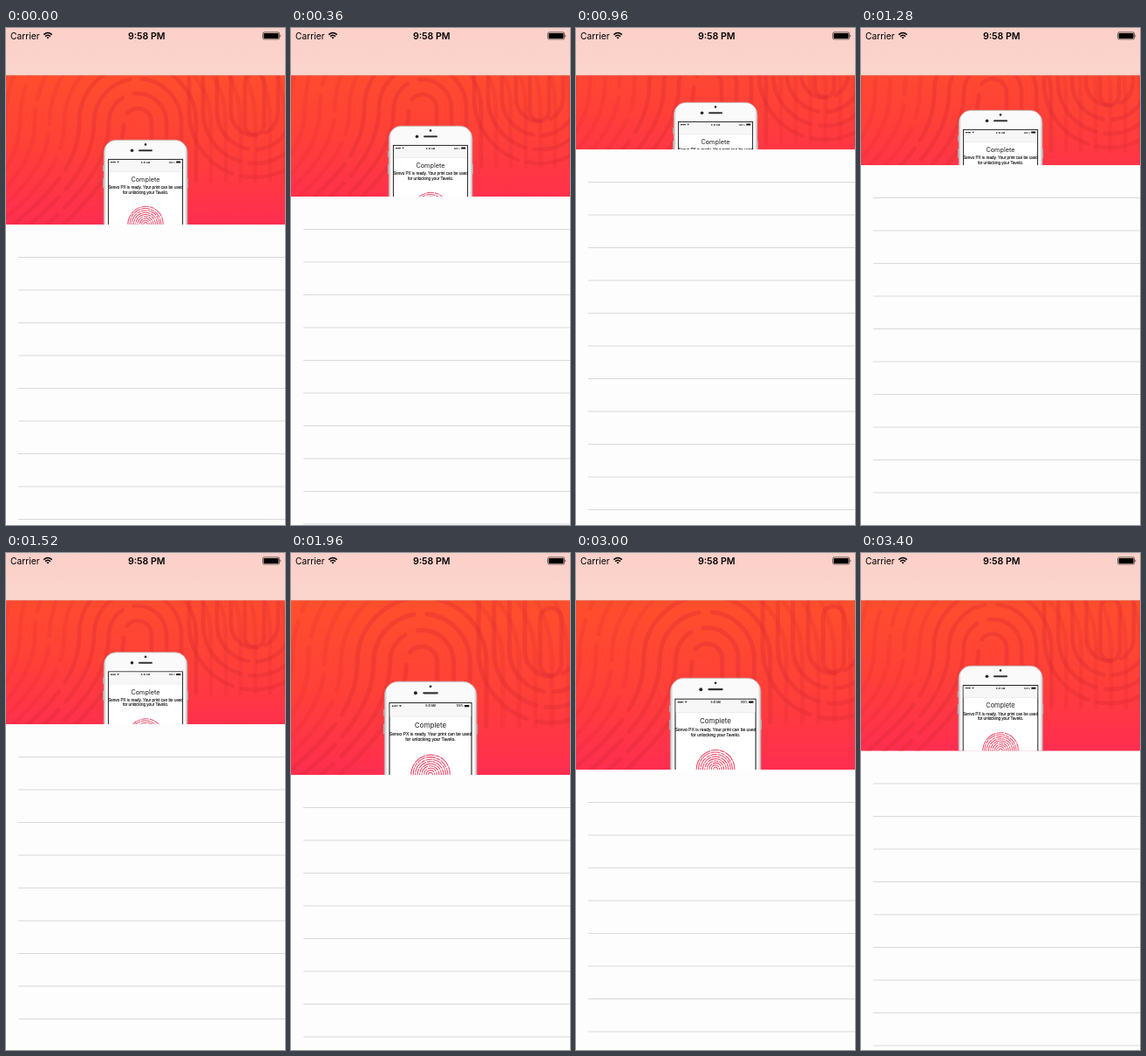
Recreate the animation shown at these times as an HTML page. Size 320 by 569 pixels, loop 3440 ms.

```html
<!DOCTYPE html>
<html lang="en">
<head>
<meta charset="utf-8">
<title>Stretchy header</title>
<style>
  html, body { margin: 0; width: 100%; height: 100%; overflow: hidden; background: #fdfdfd; }
  svg { display: block; width: 100%; height: 100%; }
  text { font-family: Inter, Roboto, "Liberation Sans", sans-serif; }
  .tiny { font: 4.6px "Liberation Sans", Inter, sans-serif; fill: #111; stroke: #111; stroke-width: .1; text-anchor: middle; }
  .status { font-size: 2.6px; font-weight: 700; fill: #222; }
</style>
</head>
<body>
<svg viewBox="0 0 320 569" preserveAspectRatio="none">
  <defs>
    <linearGradient id="sky" gradientUnits="userSpaceOnUse" x1="0" y1="45" x2="0" y2="232">
      <stop offset="0" stop-color="#ff4f2b"/>
      <stop offset=".5" stop-color="#ff4038"/>
      <stop offset="1" stop-color="#ff2c52"/>
    </linearGradient>
    <linearGradient id="bar" x2="0" y2="1">
      <stop offset="0" stop-color="#fbd0c9"/>
      <stop offset="1" stop-color="#fbd5cc"/>
    </linearGradient>
    <linearGradient id="shell">
      <stop offset="0" stop-color="#c9c6c8"/>
      <stop offset=".03" stop-color="#fafafa"/>
      <stop offset=".97" stop-color="#fafafa"/>
      <stop offset="1" stop-color="#c9c6c8"/>
    </linearGradient>
    <clipPath id="window"><rect id="pane" y="54" width="320"/></clipPath>
  </defs>
  <rect width="320" height="569" fill="#fdfdfd"/>
  <g clip-path="url(#window)">
    <g id="photo">
      <rect x="-10" y="0" width="340" height="330" fill="url(#sky)"/>
      <g id="ridges" fill="none" stroke="#d92a32" stroke-opacity=".34" stroke-width="4.6" stroke-linecap="round"/>
      <rect x="110.9" y="157" width="2" height="7" rx=".6" fill="#b9a5a8"/>
      <rect x="110.9" y="172" width="2" height="11" rx=".6" fill="#b9a5a8"/>
      <rect x="207.4" y="172" width="1.6" height="11" rx=".6" fill="#b9a5a8"/>
      <rect x="112.3" y="128.3" width="95.6" height="200" rx="14" fill="url(#shell)" stroke="#bcb5b8" stroke-width=".8"/>
      <circle cx="160" cy="133.4" r="1.3" fill="#333"/>
      <circle cx="144.5" cy="140.2" r="1.8" fill="#24242a"/>
      <rect x="152" y="139.2" width="16" height="2" rx="1" fill="#333"/>
      <rect x="117.4" y="150.4" width="85.2" height="170" fill="#fff" stroke="#222" stroke-width="1"/>
      <rect x="118" y="151" width="84" height="13.5" fill="#f7f7f8"/>
      <path d="M118 164.5H202" stroke="#d8d8dc" stroke-width=".4"/>
      <path d="M120 153.6h6" stroke="#222" stroke-width="1.3" stroke-dasharray="1.1 .3"/>
      <path d="M127.3 152.8h2.6l-1.3 1.7z" fill="#222"/>
      <text class="status" x="160" y="154.6" text-anchor="middle">9:41 AM</text>
      <text class="status" x="194" y="154.6" text-anchor="end">100%</text>
      <rect x="195.2" y="152.6" width="5" height="2" rx=".4" fill="#111"/>
      <text x="160" y="176" font-size="7.3" fill="#222" text-anchor="middle">Complete</text>
      <text class="tiny" x="160" y="184.3">Senvo PX is ready. Your print can be used</text>
      <text class="tiny" x="160" y="189.5">for unlocking your Tavelo.</text>
      <g id="print" fill="none" stroke="#ea4968" stroke-width="1"/>
    </g>
  </g>
  <g id="rows" stroke="#d5d5d8" stroke-width=".9"></g>
  <rect width="320" height="54" fill="url(#bar)"/>
  <path d="M0 54.2H320" stroke="#d99a8e" stroke-width=".6"/>
  <text x="5" y="12.6" font-size="10.3">Carrier</text>
  <g fill="none" stroke="#000" stroke-width="1.5">
    <path d="M43.3 7.6Q48 3.4 52.7 7.6M45 9.6Q48 7 51 9.6"/>
    <path d="M46.4 10.8Q48 9.6 49.6 10.8L48 12.6z" fill="#000" stroke="none"/>
  </g>
  <text x="161.3" y="12.6" font-size="10.6" font-weight="600" text-anchor="middle">9:58 PM</text>
  <rect x="294.6" y="4.9" width="19" height="8" rx="1.6" fill="none" stroke="#000" stroke-width=".6"/>
  <rect x="295.6" y="5.9" width="17" height="6" rx=".8"/>
  <path d="M314.6 7.4q1.6 1.5 0 3z"/>
</svg>
<script>
const LOOP = 3440, STEP = 40, TOP = 54, REST = 225, ROW = 37.5;
// Header bottom edge over time: [ms, y]
const keys = [
  [0, 225], [80, 224], [320, 197], [640, 166], [960, 139], [1060, 136],
  [1200, 147], [1520, 196], [1760, 232], [1960, 254], [2240, 270],
  [2440, 274], [2640, 277], [2820, 275.5], [2960, 253], [3120, 236],
  [3280, 228.8], [3400, 226.5], [3440, 225]
];
const $ = id => document.getElementById(id);

function add(parent, name, attrs) {
  const el = document.createElementNS("http://www.w3.org/2000/svg", name);
  for (const k in attrs) el.setAttribute(k, attrs[k]);
  parent.appendChild(el);
  return el;
}

// Large fingerprint behind the phone
for (let r = 16; r < 190; r += 17) {
  add($("ridges"), "path", {
    d: `M${151 + r} 175V108A${r} ${r} 0 0 0 ${151 - r} 108` +
       `C${151 - r} 155 ${118 - r} 192 ${70 - r * 1.15} 238`,
    "stroke-dasharray": `${90 + r} 14 ${130 + r / 2} 12`,
    "stroke-opacity": r > 68 ? .2 : .34
  });
}
add($("ridges"), "rect", { x: 274, y: 52, width: 22, height: 70, rx: 11 });
for (let r = 27; r < 76; r += 16) {
  add($("ridges"), "path", {
    d: `M${285 - r} 25V96A${r} ${r} 0 0 0 ${285 + r} 96V25`,
    "stroke-dasharray": `${88 + r} 11`
  });
}

// Small fingerprint on the screen
let seed = 11;
const rnd = () => (seed = seed * 16807 % 2147483647) / 2147483647;
for (let r = 2; r < 21; r += 2.25) {
  add($("print"), "ellipse", {
    cx: 160, cy: 224.5, rx: r, ry: r * 1.02,
    "stroke-dasharray": [0, 0, 0].map(() => `${(4 + rnd() * 9).toFixed(1)} .8`).join(" "),
    transform: `rotate(${Math.round(rnd() * 360)} 160 224.5)`
  });
}

const lines = Array.from({ length: 12 }, () => add($("rows"), "path", { d: "M14 0H320" }));

const slope = i => (keys[i + 1][1] - keys[i][1]) / (keys[i + 1][0] - keys[i][0]);
function tangent(i) {
  if (i === 0 || i === keys.length - 1) return 0;
  const a = slope(i - 1), b = slope(i);
  return a * b > 0 ? 2 * a * b / (a + b) : 0;
}

function edgeAt(t) {
  let i = 0;
  while (i < keys.length - 2 && t >= keys[i + 1][0]) i++;
  const [t0, y0] = keys[i], [t1, y1] = keys[i + 1];
  const h = t1 - t0, u = (t - t0) / h, v = 1 - u;
  return v * v * (1 + 2 * u) * y0 + u * u * (3 - 2 * u) * y1 +
    h * u * v * (v * tangent(i) - u * tangent(i + 1));
}

function draw(t) {
  const edge = Math.round(edgeAt(t) * 2) / 2, pull = edge - REST;
  $("pane").setAttribute("height", edge - TOP);
  // Half-speed parallax when shrinking, zoom from the bottom when stretched
  $("photo").setAttribute("transform", pull < 0
    ? `translate(0 ${pull / 2})`
    : `translate(160 ${edge}) scale(${1 + pull / 278}) translate(-160 ${-REST})`);
  lines.forEach((l, k) => l.setAttribute("transform", `translate(0 ${edge + ROW * (k + 1)})`));
}

const start = performance.now();
function tick() {
  const t = (performance.now() - start) % LOOP;
  draw(Math.floor(t / STEP) * STEP);
  requestAnimationFrame(tick);
}
tick();
</script>
</body>
</html>
```
